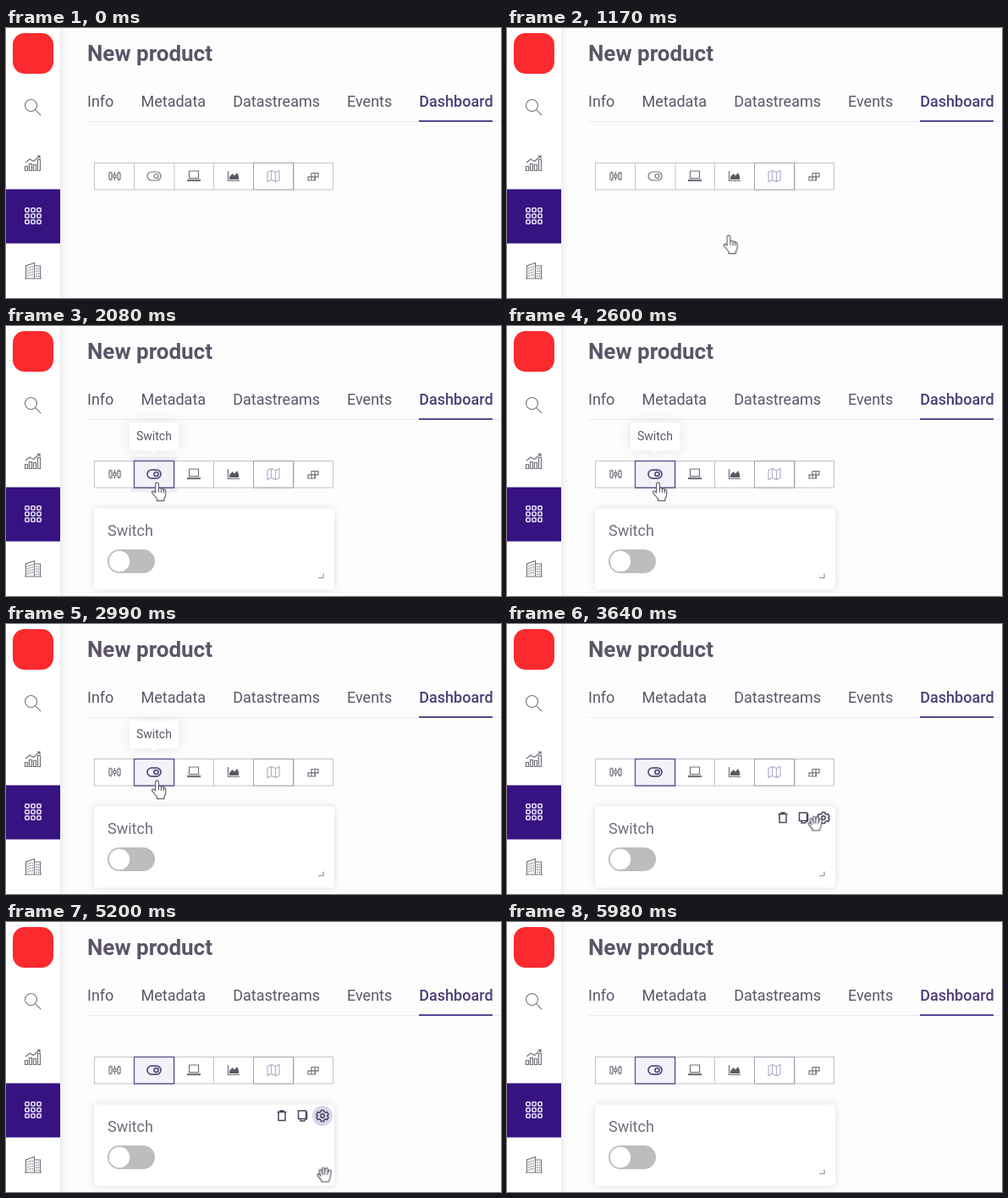
These frames come from a looping animation (585 px wide and 319 px high, 6240 ms). An HTML page:

```html
<!DOCTYPE html>
<html lang="en">
<head>
<meta charset="utf-8">
<title>New product</title>
<style>
  html, body { margin: 0; width: 100%; height: 100%; overflow: hidden; background: #fdfdfd; }
  svg { display: block; width: 585px; height: 319px; font-family: Roboto, sans-serif; }
  text { fill: #5c5568; }
  .line { fill: none; stroke: #75717c; stroke-width: 1.2; }
  .tabs { font-size: 18px; }
  .tabs .on { fill: #4c3d78; font-weight: 500; }
  .side { filter: drop-shadow(1px 0 4px #0000001c); }
  .soft { filter: drop-shadow(0 0 4px #00000020); }
  .bubble { filter: drop-shadow(0 0 8px #0000001a); }
  .act { stroke: #4a4460; stroke-width: 1.5; }

  /* 48 ticks of 130 ms */
  .anim { animation: 6.24s step-end infinite; }
  .hover { animation-name: hover; }
  .picked { animation-name: picked; }
  .wave { animation-name: wave; filter: blur(1px); }
  .tip { animation-name: tip; }
  .card { animation-name: card; }
  .tools { animation-name: tools; }
  .gear { animation-name: gear; }
  .point { animation-name: point; }
  .palm { animation-name: palm; }

  @keyframes hover { 0% { opacity: 0 } 22.917%, 100% { opacity: 1 } }
  @keyframes picked { 0% { opacity: 0 } 29.167%, 100% { opacity: 1 } }
  @keyframes wave {
    0% { opacity: 0 } 29.167% { opacity: .5 } 31.25% { opacity: 1 }
    35.417% { opacity: .6 } 37.5%, 100% { opacity: 0 }
  }
  @keyframes tip {
    0% { opacity: 0 } 27.083% { opacity: .5 } 29.167% { opacity: 1 }
    52.083% { opacity: .5 } 54.167%, 100% { opacity: 0 }
  }
  @keyframes card { 0% { opacity: 0 } 31.25%, 100% { opacity: 1 } }
  @keyframes tools { 0% { opacity: 0 } 54.167% { opacity: 1 } 85.417%, 100% { opacity: 0 } }
  @keyframes gear {
    0% { opacity: 0 } 60.417% { opacity: .6 } 62.5% { opacity: 1 } 85.417%, 100% { opacity: 0 }
  }
  @keyframes point {
    0% { opacity: 0; transform: translate(262px, 246px) }
    18.75% { opacity: 1; transform: translate(262px, 246px) }
    20.833% { opacity: 1; transform: translate(218px, 212px) }
    22.917% { opacity: 1; transform: translate(186px, 189px) }
    25% { opacity: 1; transform: translate(178.5px, 186px) }
    50% { opacity: 1; transform: translate(196px, 188px) }
    52.083% { opacity: 0; transform: translate(240px, 198px) }
    60.417% { opacity: 1; transform: translate(373px, 229px) }
    83.333%, 100% { opacity: 0; transform: translate(373px, 229px) }
  }
  @keyframes palm {
    0% { opacity: 0; transform: translate(246px, 208px) }
    52.083% { opacity: 1; transform: translate(246px, 208px) }
    54.167% { opacity: 1; transform: translate(304px, 222px) }
    56.25% { opacity: 1; transform: translate(345px, 231px) }
    58.333% { opacity: 1; transform: translate(364.5px, 235.5px) }
    60.417% { opacity: 0; transform: translate(364.5px, 235.5px) }
    83.333% { opacity: 1; transform: translate(376.5px, 298.5px) }
    85.417%, 100% { opacity: 0; transform: translate(376.5px, 298.5px) }
  }
</style>
</head>
<body>
<svg viewBox="0 0 585 319">
  <defs>
    <g id="switch">
      <rect x="-8" y="-5" width="16" height="10" rx="5"/>
      <circle cx="2.5" r="2.5"/>
    </g>
    <path id="cog" d="M-1.6-6.6h3.2l.5 1.9 1.5.8 1.9-.6 1.6 2.8-1.4 1.4v.6l1.4 1.4-1.6 2.8-1.9-.6-1.5.8-.5 1.9h-3.2l-.5-1.9-1.5-.8-1.9.6-1.6-2.8 1.4-1.4v-.6l-1.4-1.4 1.6-2.8 1.9.6 1.5-.8z"/>
  </defs>

  <rect class="side" x="-10" y="-10" width="74" height="340" fill="#fff"/>
  <rect x="8" y="6" width="48" height="48" rx="14" fill="#fb2a2e"/>
  <rect y="190.5" width="64" height="64" fill="#371281"/>

  <g class="line">
    <g transform="translate(32 94)" stroke-width="1.1">
      <circle cx="-2.5" cy="-2.5" r="7"/>
      <path d="M2.6 2.6l6.6 6.6"/>
    </g>
    <g transform="translate(32 160)">
      <path d="M-9.5 8.5v-5h3v5zM-4.5 8.5v-8h3v8zM.5 8.5v-7h3v7zM5.5 8.5v-13h3v13z"/>
      <path d="M-9-1l5-4 4.5 2.5L8-9M4.5-9H8v3.5"/>
    </g>
    <g transform="translate(32 222)" id="grid" stroke="#e4dff0" stroke-width="1.6"></g>
    <g transform="translate(32 286.5)">
      <path d="M-8.5 9.5v-15l10-3.5v18.5M1.5-5.5h7v15M-10 9.5h20"/>
      <path d="M-6-3.5v11M-3.5-4.5v12M-1-5v12.5M4-3v11M6.3-3v11" stroke-dasharray="1.5 1.5"/>
    </g>
  </g>

  <text x="96" y="39" font-size="26" font-weight="600">New product</text>
  <g class="tabs">
    <text x="96" y="93">Info</text>
    <text x="159.5" y="93">Metadata</text>
    <text x="268.2" y="93">Datastreams</text>
    <text x="403" y="93">Events</text>
    <text x="488.3" y="93" class="on">Dashboard</text>
  </g>
  <path d="M96 110.5H585" stroke="#ebeaee"/>
  <path d="M488 110H575" stroke="#5a4592" stroke-width="1.8"/>

  <rect class="anim wave" x="147" y="155" width="56" height="41" rx="3" fill="#ebeaf1"/>
  <rect x="104.5" y="159.5" width="282" height="31.5" fill="#fff" stroke="#c4c2cb"/>
  <path d="M151.5 160v31M199 160v31M245.5 160v31M340 160v31" stroke="#c4c2cb"/>
  <rect x="292.5" y="159.5" width="47" height="31.5" fill="#fff" stroke="#a29fae"/>
  <rect class="anim hover" x="151.5" y="159.5" width="47" height="31.5" fill="#fafafb" stroke="#77737f"/>
  <rect class="anim picked" x="151.5" y="159.5" width="47" height="31.5" fill="#f4f2f9" stroke="#5c4f88" stroke-width="1.3"/>

  <g class="line" stroke-width="1.4">
    <path transform="translate(128.5 175)" d="M-6.5-4h3v8h-3zM-5-5.5V-4M-5 4v1.5M-1.5-1.5h3v3h-3zM0-5v3.5M0 1.5V5M3.5-3.5h3v7h-3zM5-5.5v2M5 3.5v2"/>
    <use href="#switch" x="175" y="175"/>
    <g transform="translate(222 175)">
      <path d="M-5.5-6h11v8.5h-11z"/>
      <path d="M-8 5h16" stroke-width="2.4"/>
    </g>
    <g transform="translate(269 175)">
      <path d="M-6.5-6V5.5H7"/>
      <path d="M-5 4V1l3.5-4L1-.5 4-4 6 0v4z" fill="#5d5865" stroke="none"/>
    </g>
    <path transform="translate(316 175)" stroke="#b7afcc" d="M-7-4.5l4.500-2 5 2 4.500-2v11l-4.500 2-5-2-4.500 2zM-2.500-6.500v11M2.500-4.500v11"/>
    <path transform="translate(363 175.5)" d="M-6 .3h8.500v4.200H-6zM-2-4H6V.3H-2zM-2-4v8.500M2-4v8.500"/>
  </g>
  <g class="line anim picked">
    <use href="#switch" x="175" y="175" stroke="#55477f" stroke-width="1.5"/>
  </g>

  <g class="anim tip">
    <path class="bubble" d="M149 114h52q3 0 3 3v27q0 3-3 3h-23l-3 3-3-3h-23q-3 0-3-3v-27q0-3 3-3z" fill="#fff"/>
    <text x="154" y="135" font-size="14">Switch</text>
  </g>

  <g class="anim card">
    <rect class="soft" x="104" y="215.5" width="284" height="96" rx="4" fill="#fff"/>
    <text x="120" y="248" font-size="18" style="fill:#726d7c">Switch</text>
    <rect x="120" y="264" width="56" height="28" rx="14" fill="#bdbdbd"/>
    <circle cx="134" cy="278" r="12.2" fill="#fff"/>
    <path d="M369 297.5h6v-5" class="line" style="stroke:#96939c"/>
  </g>

  <circle class="anim gear" cx="374" cy="229" r="12" fill="#dad5e8"/>
  <g class="anim tools">
    <g class="line act">
      <path transform="translate(326 229)" d="M-5.5-4.5h11M-2-4.5V-6h4v1.5M-4-4.5v10h8v-10"/>
      <path transform="translate(350 229)" d="M-4.5-6h9v9.500h-9zM-2 3.500V6h4.500l3-2.500V-5"/>
      <g transform="translate(374 229)">
        <use href="#cog"/>
        <circle r="2.2"/>
      </g>
    </g>
  </g>

  <g fill="#fff" stroke="#5b5864" stroke-width="1.2" stroke-linejoin="round" stroke-linecap="round">
    <g class="anim point">
      <g transform="scale(.93)">
        <path d="M-2 11V1Q-2-1 0-1T2 1V7Q2 5.500 3.700 5.700T5.300 7.500Q5.600 6.400 7 6.700T8.400 8.600Q8.800 7.600 9.900 8T11 10V14Q11 17 9 19V22H0V19.500L-6 12.500Q-7 10.500-5.500 9.800T-2 12z"/>
        <path d="M2 7v4M5.300 7.500v4M8.400 8.600v3" fill="none"/>
      </g>
    </g>
    <g class="anim palm">
      <path d="M-3.500 8.500V7L-8 1.500Q-9-.500-7.500-.800T-4.500 1.500L-6.300-4Q-6.600-5.800-5.300-6T-3.500-4.500L-2.500-2-3-6.500Q-2.900-8.200-1.500-8.200T0-6.700L.300-2.500 1-6.500Q1.500-8 2.800-7.800T4-6L3.700-2 5-4.500Q5.800-5.800 7-5.300T7.800-3.500L6.800 2Q6.500 5 5 7V8.500z"/>
      <path d="M-2.500-2l.5 2M.300-2.500V0M3.700-2l-.3 2" fill="none"/>
    </g>
  </g>
</svg>
<script>
  const ticks = [-7, 0, 7];
  document.getElementById('grid').innerHTML = ticks.flatMap(y => ticks.map(x =>
    `<rect x="${x - 2.2}" y="${y - 2.2}" width="4.4" height="4.4" rx="1.2"/>`)).join('');
</script>
</body>
</html>
```
